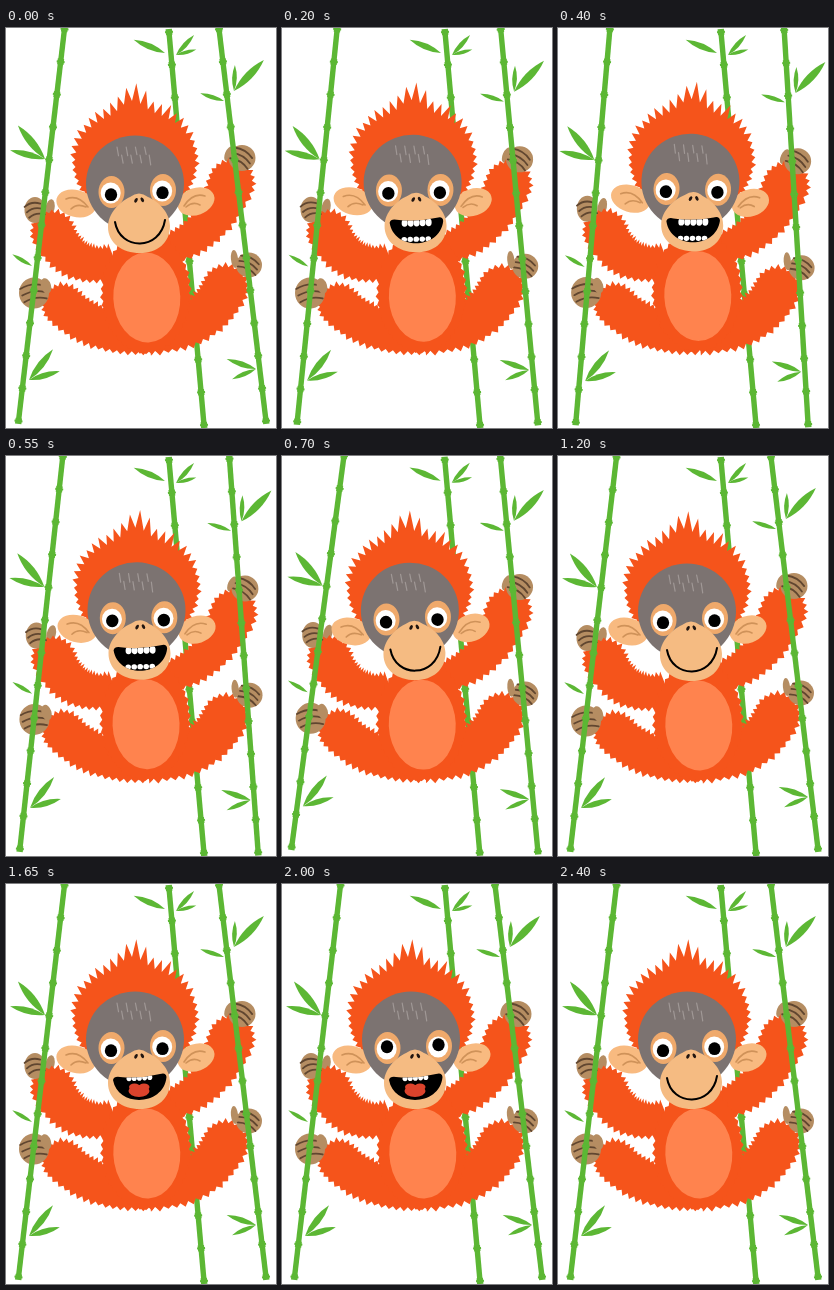
An HTML page with a canvas for the animation above (3.5 s loop, 270 by 400 pixels).

```html
<!DOCTYPE html>
<html lang="en">
<head>
<meta charset="utf-8">
<title>Swinging orangutan</title>
<style>
html, body { margin: 0; width: 100%; height: 100%; overflow: hidden; background: #fff; }
canvas { display: block; width: 270px; height: 400px; }
</style>
</head>
<body>
<canvas id="stage"></canvas>
<script>
const LOOP = 3500, STEP = 50, SWAY = 1200;
const GREEN = '#5cb734', FUR = '#f5541b', BELLY = '#ff834e', GRAY = '#7c7371';
const SKIN = '#f5bb82', PATCH = '#efa96b', EAR = '#f8ba80', CREASE = '#cf9259';
const PAW = '#b58d62', DARK = '#604630', TONGUE = '#dc432c';
const RAD = Math.PI / 180;

const canvas = document.getElementById('stage');
const ctx = canvas.getContext('2d');
const ratio = window.devicePixelRatio || 1;
canvas.width = 270 * ratio;
canvas.height = 400 * ratio;

const mix = (a, b, u) => a + (b - a) * u;
const noise = i => Math.abs(Math.sin(i * 12.9898 + 4) * 43758.5453) % 1;

// Soft pulse within the sway, 1 at its peak time
function pulse(t, peak) {
  if (t <= 0 || t >= SWAY) return 0;
  const power = Math.log(0.5) / Math.log(peak / SWAY);
  return Math.sin(Math.PI * (t / SWAY) ** power) ** 5;
}

function poses(t) {
  const a = pulse(t, 400), b = pulse(t, 700), c = pulse(t, 900);
  const left = -2 * a + 1.6 * b - 0.3 * c;
  const right = 3.3 * a + 0.4 * b;
  const lift = -1.6 * (a + c);
  const part = (px, py, turn, dx, dy) => ({ px, py, turn: turn * RAD, dx, dy });
  return {
    leftStalk: part(34, 218, left, 0, a - 1.6 * b - 1.3 * c),
    rightStalk: part(240, 225, right, 0, 2 * a + 2 * b - 2 * c),
    midStalk: part(180, 200, 0, -c, -c),
    body: part(141, 270, 0, -a - c, lift),
    head: part(134, 222, 3.2 * a - 1.6 * b - 0.5 * c, -c, lift),
    leftArm: part(98, 230, 2.4 * b - 0.6 * c, -c, lift / 2),
    rightArm: part(165, 215, right * 0.75, 0, -c),
    leftLeg: part(135, 292, 1.3 * b, 0, -c),
    rightLeg: part(150, 292, right * 0.5, -a, -c)
  };
}

function posed({ px, py, turn, dx, dy }, draw) {
  ctx.save();
  ctx.translate(px + dx, py + dy);
  ctx.rotate(turn);
  ctx.translate(-px, -py);
  draw();
  ctx.restore();
}

function oval(x, y, rx, ry, color, turn = 0) {
  ctx.beginPath();
  ctx.ellipse(x, y, rx, ry, turn, 0, Math.PI * 2);
  ctx.fillStyle = color;
  ctx.fill();
}

function stroke(path, color, width) {
  ctx.strokeStyle = color;
  ctx.lineWidth = width;
  ctx.lineCap = ctx.lineJoin = 'round';
  ctx.stroke(new Path2D(path));
}

function fill(path, color) {
  ctx.fillStyle = color;
  ctx.fill(typeof path === 'string' ? new Path2D(path) : path);
}

// Zigzag along an outline; at(v) gives a base point and its outward angle
function fringe(teeth, at, depth) {
  const path = new Path2D();
  for (let i = 0; i < teeth; i++) {
    const base = at(i / teeth), v = (i + 0.5) / teeth, tip = at(v);
    const reach = depth(v) * (0.75 + 0.5 * noise(i));
    path.lineTo(base.x, base.y);
    path.lineTo(tip.x + reach * Math.cos(tip.out), tip.y + reach * Math.sin(tip.out));
  }
  path.closePath();
  return path;
}

// Furry limb around a quadratic spine, with a round far end
function limb([x0, y0], [x1, y1], [x2, y2], r0, r1) {
  const at = v => {
    const side = v < 0.36 ? -1 : v > 0.64 ? 1 : (v - 0.5) / 0.14;
    const u = Math.min(1, v / 0.36, (1 - v) / 0.36);
    const out = Math.atan2(mix(y1 - y0, y2 - y1, u), mix(x1 - x0, x2 - x1, u)) + side * Math.PI / 2;
    const r = mix(r0, r1, u) - 2;
    return {
      x: mix(mix(x0, x1, u), mix(x1, x2, u), u) + r * Math.cos(out),
      y: mix(mix(y0, y1, u), mix(y1, y2, u), u) + r * Math.sin(out),
      out
    };
  };
  return fringe(40, at, () => 4);
}

function torsoAt(v) {
  const out = v * 2 * Math.PI;
  return { x: 140 + 43 * Math.cos(out), y: 265 + 59 * Math.sin(out), out };
}

const hairAngle = v => (v - 0.5) * 230 * RAD;
const hairDepth = v => 4 + 11 * Math.max(0, Math.cos(hairAngle(v))) ** 3;
function hairAt(v) {
  const d = hairAngle(v), out = d - 93 * RAD;
  const r = 61 + 20 * Math.cos(d) + 11 * Math.exp(-((d / 0.2) ** 2)) - hairDepth(v);
  return { x: 130 + r * Math.cos(out), y: 150 + r * Math.sin(out), out };
}

const shapes = {
  hair: fringe(36, hairAt, hairDepth),
  torso: fringe(46, torsoAt, () => 2.5),
  leftArm: limb([110, 233], [68, 246], [47, 205], 16, 22),
  rightArm: limb([155, 223], [205, 212], [225, 155], 14, 23),
  leftLeg: limb([140, 305], [90, 308], [57, 277], 20, 21),
  rightLeg: limb([140, 305], [198, 304], [219, 260], 20, 23)
};

function stalk(x1, y1, x2, y2) {
  const nodes = 12;
  const len = Math.hypot(x2 - x1, y2 - y1);
  ctx.save();
  ctx.translate(x1, y1);
  ctx.rotate(Math.atan2(y2 - y1, x2 - x1));
  ctx.fillStyle = GREEN;
  ctx.fillRect(0, -2.7, len, 5.4);
  for (let i = 0; i <= nodes; i++) {
    ctx.fillRect(i * len / nodes - 3, -3.2, 6, 6.4);
    ctx.fillRect(i * len / nodes - 1, -4, 2, 8);
  }
  ctx.restore();
}

function leaf(x, y, len, degrees) {
  const w = len * 0.18;
  ctx.save();
  ctx.translate(x, y);
  ctx.rotate(degrees * RAD);
  fill(`M0 0 Q${len / 2} ${w} ${len} 0 Q${len / 2} ${-w} 0 0`, GREEN);
  ctx.restore();
}

// Leaves follow their joint on the stalk but keep their own slant
function sprig(part, x, y, ...tips) {
  posed(part, () => {
    ctx.translate(x, y);
    ctx.rotate(-part.turn);
    for (const [len, degrees] of tips) leaf(0, 0, len, degrees);
  });
}

function paw(x, y, rx, ry, tilt) {
  oval(x, y, rx, ry, PAW);
  ctx.save();
  ctx.translate(x, y);
  ctx.rotate(tilt);
  for (let i = -1; i <= 1; i++) {
    const h = i * ry * 0.45;
    stroke(`M${-rx * 0.8} ${h - 1} Q0 ${h - 4} ${rx * 0.7} ${h + 2}`, DARK, 1.8);
  }
  ctx.restore();
}

function eye(x, y, look) {
  oval(x, y - 1, 13, 16, PATCH);
  oval(x - 0.5, y, 10, 10.5, '#fff');
  oval(x, y + 1.5, 6.2, 6.4, '#000', 0);
}

function row(x, y, gap, rx, ry) {
  for (let i = 0; i < 5; i++) oval(x + i * gap, y - i * 0.3, rx, ry, '#fff');
}

function mouth(kind) {
  if (kind === 'smile') {
    stroke('M109 194 C114 223 154 223 159 192', '#000', 2);
    return;
  }
  const drop = kind === 'half' ? 211 : 222;
  const lips = new Path2D(`M107 196 Q108 192 114 193 Q134 195 154 190 Q160 188 160.500 193 C158 ${drop} 112 ${drop + 2} 107 196 Z`);
  ctx.save();
  fill(lips, '#000');
  ctx.clip(lips);
  if (kind === 'teeth') {
    row(122, 196, 6, 3, 3.8);
    row(122, 212.5, 6, 2.8, 2.6);
  } else {
    oval(133, 207, 10.5, 6, TONGUE);
    oval(128.5, 203, 5.5, 3.5, TONGUE);
    oval(138, 203, 5.5, 3.5, TONGUE);
    row(123, 194.5, 5.2, 2.5, 2.8);
  }
  ctx.restore();
}

function mouthAt(t) {
  const within = (from, to) => t >= from && t < to;
  if (within(150, 600)) return 'teeth';
  if (within(800, 1100) || within(1500, 2250)) return 'open';
  if (within(1400, 1500) || within(2250, 2350)) return 'half';
  return 'smile';
}

function eyeShift(t) {
  const u = (t - 1650) / 750;
  return u > 0 && u < 1 ? -4 * Math.sin(Math.PI * u) ** 2 : 0;
}

function eyes(t) {
  const shift = eyeShift(t);
  for (const [x, y] of [[105, 165], [156.5, 163]]) {
    oval(x + 0.5, y - 1, 13, 16, PATCH);
    oval(x - 0.3, y, 10, 10.5, '#fff');
    oval(x, y + 1.7 + shift, 6.2, 6.4, '#000');
  }
}

function head(t) {
  fill(shapes.hair, FUR);
  oval(70, 175.5, 20, 13.5, EAR, 0.25);
  oval(190, 173.5, 19, 13.5, EAR, -0.35);
  stroke('M60 171 Q72 166 82 179 M65 181 Q71 175 80 179', CREASE, 1.6);
  stroke('M199 168 Q187 164 178 178 M194 177 Q187 173 180 179', CREASE, 1.6);
  oval(129, 155.5, 49, 48, GRAY);
  for (let i = 0; i < 8; i++) {
    stroke(`M${111 + i * 4.6} ${119 + i % 2 * 8} l1.5 ${7 + 3 * noise(i)}`, '#a09896', 1.2);
  }
  eyes(t);
  fill('M124 169 Q133 162 142 169 C154 174 164 186 164 198 C164 215 151 225 134 225 C116 225 102 215 102 199 C102 186 113 174 124 169 Z', SKIN);
  oval(130, 172.3, 1.5, 2.5, '#211510', 0.5);
  oval(136.3, 171.8, 1.5, 2.5, '#211510', -0.5);
  mouth(mouthAt(t));
}

function render(t) {
  const p = poses(t);
  ctx.setTransform(ratio, 0, 0, ratio, 0, 0);
  ctx.fillStyle = '#fff';
  ctx.fillRect(0, 0, 270, 400);

  posed(p.midStalk, () => stalk(163, 4, 198, 397));
  sprig(p.midStalk, 159, 25, [34, 203]);
  sprig(p.midStalk, 170, 27, [27, -48], [21, -15]);

  posed(p.leftArm, () => {
    oval(44, 180, 4.5, 9, PAW, 0.2);
    fill(shapes.leftArm, FUR);
    paw(29, 182, 10.5, 13, -0.4);
  });
  posed(p.rightArm, () => {
    oval(223, 126, 4, 8, PAW, 0.4);
    fill(shapes.rightArm, FUR);
    paw(236, 130, 13.5, 13, 0.4);
  });
  posed(p.leftLeg, () => {
    fill(shapes.leftLeg, FUR);
    paw(28, 265, 15, 15.5, -0.3);
    oval(40, 258, 5, 8, PAW, -0.3);
  });
  posed(p.rightLeg, () => {
    fill(shapes.rightLeg, FUR);
    paw(243, 237, 13, 12.5, 0.3);
    oval(228.5, 231, 3.6, 9, PAW, -0.1);
  });
  posed(p.body, () => {
    fill(shapes.torso, FUR);
    oval(140.8, 269.5, 33.5, 45, BELLY, -0.04);
  });
  posed(p.head, () => head(t));

  posed(p.leftStalk, () => stalk(58.5, 1, 12.5, 393));
  sprig(p.leftStalk, 39, 131, [43, 231], [36, 194]);
  sprig(p.leftStalk, 26, 238, [23, 211]);
  sprig(p.leftStalk, 23, 352, [39, -52], [32, -16]);
  posed(p.rightStalk, () => stalk(213, 1, 260, 393));
  sprig(p.rightStalk, 228, 63, [43, -46], [26, -88]);
  sprig(p.rightStalk, 218, 73, [25, 198]);
  sprig(p.rightStalk, 250, 341, [31, 199], [26, 157]);
}

function tick() {
  const t = performance.now() % LOOP;
  render(Math.floor(t / STEP) * STEP);
  requestAnimationFrame(tick);
}
tick();
</script>
</body>
</html>
```
